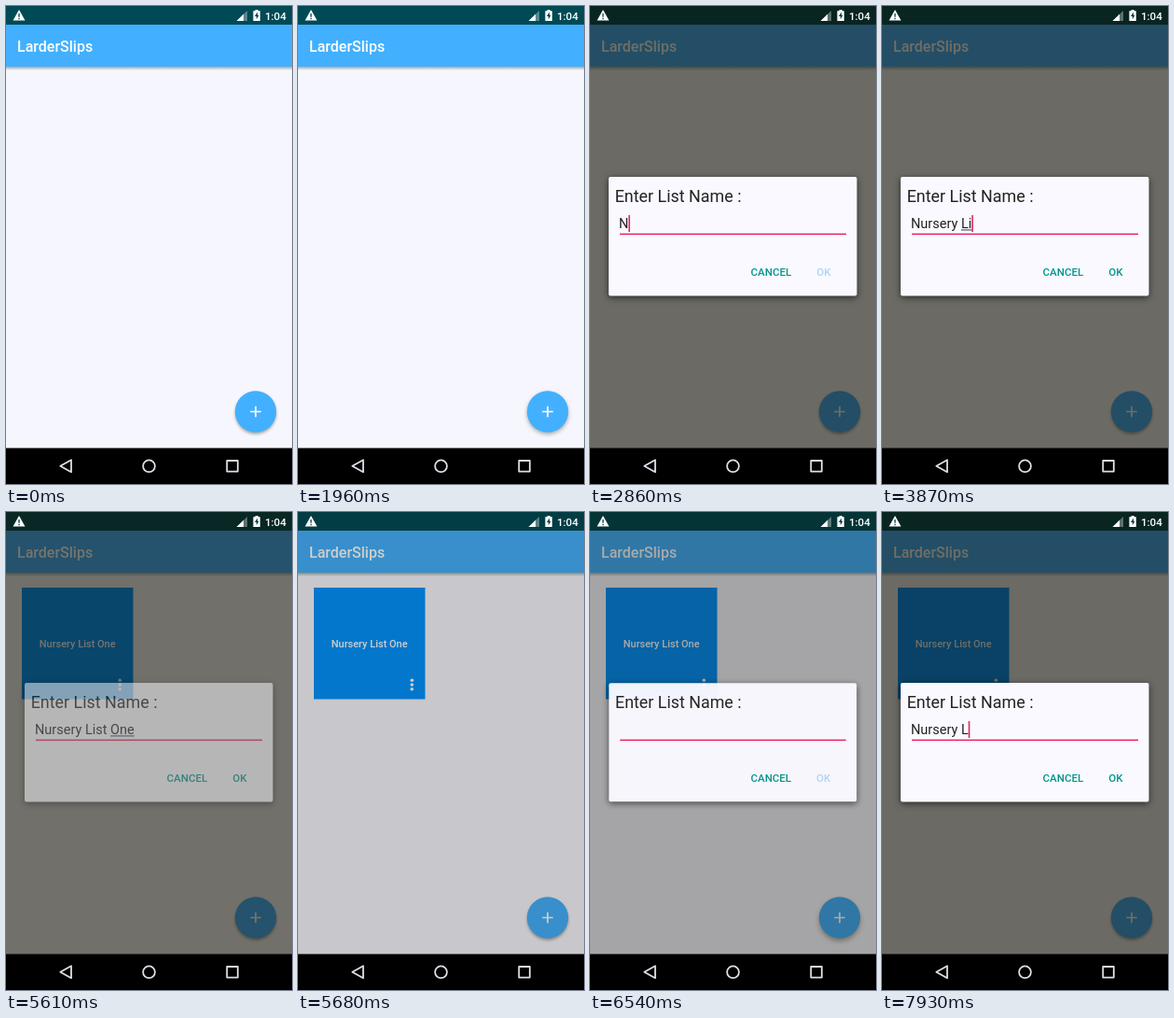
Write an HTML page that moves like this. It is 307 by 512 pixels and loops after 8 s.

```html
<!DOCTYPE html>
<html lang="en">
<head>
<meta charset="utf-8">
<title>List app</title>
<style>
  html, body { margin: 0; width: 100%; height: 100%; overflow: hidden; background: #000; }
  svg { display: block; width: 100vw; height: 100vh; }
  text { font-family: Roboto, "Noto Sans", sans-serif; white-space: pre; }
  .medium { font-weight: 500; }
  .nav { fill: none; stroke: #dedee8; stroke-width: 1.8; stroke-linejoin: round; }

  #dim, #dialog, #tile, #ok, #fab, #ripple { animation: 8000ms linear infinite; }
  #dim { animation-name: dim; }
  #dialog { animation-name: dialog; transform-origin: 153px 247px; filter: drop-shadow(0 2px 3.5px rgba(0, 0, 0, .6)); }
  #tile { animation-name: tile; animation-timing-function: step-end; }
  #ok { animation-name: ok; }
  #fab { animation-name: lift; }
  #ripple { animation-name: ripple; transform-origin: 268px 435px; }

  @keyframes dim {
    0%, 28.25% { opacity: 0; }
    29.75%, 32.49% { opacity: .8; }
    32.5%, 69.5% { opacity: 1; }
    70.3% { opacity: .95; }
    71.4%, 80.6% { opacity: 0; }
    82.6%, 100% { opacity: 1; }
  }
  @keyframes dialog {
    0%, 28.25% { opacity: 0; transform: scale(.93); }
    29.3%, 69.4% { opacity: 1; transform: none; }
    70.1% { opacity: .54; transform: none; }
    70.8% { opacity: 0; transform: none; }
    70.9%, 80.6% { opacity: 0; transform: scale(.93); }
    81.8%, 100% { opacity: 1; transform: none; }
  }
  @keyframes tile {
    0% { opacity: 0; }
    68.9%, 100% { opacity: 1; }
  }
  @keyframes ok {
    0%, 35.74% { fill: #b0d6f8; }
    36.5%, 72% { fill: #00958c; }
    72.1%, 86.49% { fill: #b0d6f8; }
    87.2%, 100% { fill: #00958c; }
  }
  @keyframes lift {
    0%, 24.4%, 30%, 79.2%, 83%, 100% { filter: drop-shadow(0 2.5px 1.8px rgba(40, 35, 0, .36)); }
    25.75%, 28.25%, 80.3%, 81% { filter: drop-shadow(0 3.5px 3px rgba(40, 35, 0, .36)); }
  }
  @keyframes ripple {
    0%, 24.4% { opacity: 0; transform: scale(.3); }
    25% { opacity: .14; transform: scale(.7); }
    25.75%, 28.25% { opacity: .08; transform: none; }
    29%, 79.2% { opacity: 0; transform: scale(.3); }
    80% { opacity: .14; transform: scale(.7); }
    81%, 100% { opacity: 0; transform: none; }
  }
</style>
</head>
<body>
<svg viewBox="0 0 307 512" preserveAspectRatio="none">
  <defs>
    <linearGradient id="shade" x2="0" y2="1">
      <stop stop-color="#282300" stop-opacity=".36"/>
      <stop offset="1" stop-color="#282300" stop-opacity="0"/>
    </linearGradient>
  </defs>

  <!-- main screen -->
  <rect width="307" height="474" fill="#f6f6fe"/>
  <rect width="307" height="20" fill="#004a55"/>
  <rect y="20" width="307" height="45" fill="#42b0ff"/>
  <rect y="65" width="307" height="4" fill="url(#shade)"/>
  <text class="medium" x="12" y="49" font-size="16" fill="#fff">LarderSlips</text>

  <g id="tile" fill="#fff">
    <rect x="17" y="81" width="119.5" height="119.5" fill="#0092ff"/>
    <text class="medium" x="76.7" y="145" font-size="11" text-anchor="middle">Nursery List One</text>
    <circle cx="122.3" cy="180.3" r="1.8"/>
    <circle cx="122.3" cy="185" r="1.8"/>
    <circle cx="122.3" cy="189.7" r="1.8"/>
  </g>

  <g id="fab">
    <circle cx="268" cy="434.5" r="22.2" fill="#42b0ff"/>
    <circle id="ripple" cx="268" cy="434.5" r="22.2" fill="#fff"/>
    <path d="M262.2 434.5h11.6M268 428.7v11.6" stroke="#fff" stroke-width="1.7"/>
  </g>

  <rect id="dim" width="307" height="474" fill="#100e00" fill-opacity=".6"/>

  <!-- status icons -->
  <g fill="#fff">
    <path d="M14 4l6.5 11.5h-13z"/>
    <path d="M14 8v3.8M14 12.7v1.5" stroke="#003c44" stroke-width="1.3"/>
    <path d="M259 5v11h-11.5z" opacity=".35"/>
    <path d="M255 8.8v7.2h-7.5z"/>
    <path d="M267.6 4h3v1.3h2.2v10.7h-7.4v-10.7h2.2z"/>
    <path d="M269.9 6.5l-2.9 4.5h1.8v3.3l2.7-4.5h-1.6z" fill="#003c44"/>
    <text class="medium" x="300.8" y="14.5" font-size="11.6" text-anchor="end">1:04</text>
  </g>

  <!-- dialog -->
  <g id="dialog">
    <rect x="20" y="183" width="266.5" height="127.5" rx="2" fill="#f9f9ff"/>
    <text x="26.7" y="210" font-size="17.9" fill="#222">Enter List Name :</text>
    <text id="typed" x="31" y="238" font-size="14.5" fill="#222"></text>
    <rect id="underline" y="239.3" height="1.2" fill="#4a5a78"/>
    <rect id="cursor" y="224" width="1.6" height="18" fill="#e8245c"/>
    <rect x="32" y="243.6" width="243" height="1.5" fill="#e8245c"/>
    <text class="medium" x="172.6" y="289" font-size="11.5" fill="#00958c">CANCEL</text>
    <text class="medium" id="ok" x="243.3" y="289" font-size="11.5">OK</text>
  </g>

  <!-- navigation bar -->
  <rect y="473.5" width="307" height="38.5"/>
  <path class="nav" d="M58.3 492.7l11.7-6.5v13z"/>
  <circle class="nav" cx="153.5" cy="492.8" r="6.4"/>
  <rect class="nav" x="237.2" y="487" width="11.6" height="11.6"/>
</svg>

<script>
  const LOOP = 8000, LEFT = 31, REOPEN = 6340;
  const PHRASE = "Nursery List One";
  const firstKeys = [2860, 2960, 3070, 3180, 3290, 3400, 3510, 3750, 3810, 3870, 3980, 4090, 4350, 4790, 4940, 5090];
  const secondKeys = [6920, 7110, 7300, 7380, 7460, 7540, 7620, 7800, 7930];
  const cursorTimes = [[2600, 4650], [4790, 5510], [6610, LOOP]];
  const underlineTimes = [[3870, 4090], [5370, REOPEN]];

  const [typed, underline, cursor] = ["typed", "underline", "cursor"].map(id => document.getElementById(id));
  const within = (t, spans) => spans.some(([from, to]) => t >= from && t < to);
  const show = (el, on) => el.setAttribute("visibility", on ? "visible" : "hidden");

  function render(t) {
    const keys = t < REOPEN ? firstKeys : secondKeys;
    const count = keys.filter(k => k <= t).length;
    const text = PHRASE.slice(0, count);
    if (typed.textContent !== text) typed.textContent = text;

    const width = count ? typed.getComputedTextLength() : 0;
    cursor.setAttribute("x", LEFT + width);
    show(cursor, within(t, cursorTimes));

    const underlined = within(t, underlineTimes);
    show(underline, underlined);
    if (underlined) {
      const start = typed.getSubStringLength(0, text.lastIndexOf(" ") + 1);
      underline.setAttribute("x", LEFT + start);
      underline.setAttribute("width", width - start);
    }
  }

  const began = performance.now();
  function tick() {
    render((performance.now() - began) % LOOP);
    requestAnimationFrame(tick);
  }
  tick();
</script>
</body>
</html>
```
